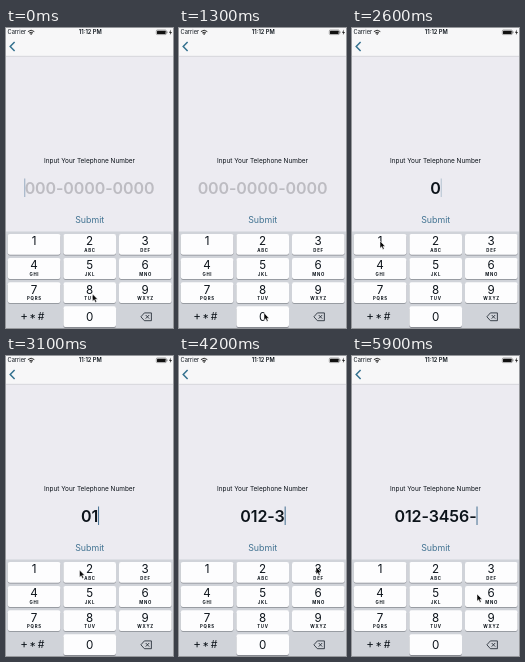
Animation, 167 px wide and 300 px high, one loop 6000 ms. Source, as an HTML page:

```html
<!DOCTYPE html>
<html lang="en">
<head>
<meta charset="utf-8">
<title>Telephone number input</title>
<style>
  html, body { margin: 0; width: 100%; height: 100%; overflow: hidden; background: #ecebf1; }
  svg { display: block; width: 167px; height: 300px; }
  text { font-family: Inter, "Liberation Sans", sans-serif; fill: #0c131a; text-anchor: middle; }
  .status { font-size: 5.7px; }
  .digit { font-size: 11.6px; }
  .letters { font-size: 4.3px; font-weight: 700; letter-spacing: .75px; }
  #number { font-size: 16px; font-weight: 600; letter-spacing: -.1px; }
  #number.hint { fill: #bdbcc2; }
</style>
</head>
<body>
<svg viewBox="0 0 167 300">
  <rect width="167" height="300" fill="#ecebf1"/>
  <rect width="167" height="28" fill="#f7f7f8"/>
  <path d="M0 28.3H167" stroke="#c6c6ca" stroke-width=".6"/>

  <text class="status" x="1.5" y="6.4" style="text-anchor:start">Carrier</text>
  <g fill="none" stroke="#111" stroke-width=".9">
    <path d="M21.9 3.6Q25.1 .8 28.3 3.6M23.2 5Q25.1 3.4 27 5"/>
    <path d="M24 5.7Q25.1 5 26.2 5.7L25.1 7z" fill="#111" stroke="none"/>
  </g>
  <text class="status" x="84.3" y="6.4" font-weight="600">11:12 PM</text>
  <rect x="150.3" y="2" width="10" height="4.6" rx="1" fill="none" stroke="#555" stroke-width=".5"/>
  <rect x="151" y="2.7" width="8.6" height="3.2" rx=".5" fill="#111"/>
  <path d="M161 3.4v1.8" stroke="#555" stroke-width=".7"/>
  <path d="M165 1.6L163 4.7h1.4L163.8 7.1L166 3.9h-1.5z" fill="#111"/>
  <path d="M8.6 14L4.2 18.5L8.6 23" fill="none" stroke="#34718f" stroke-width="1.5"/>

  <text x="83.5" y="135.3" font-size="6.45">Input Your Telephone Number</text>
  <text id="number" x="83.5" y="165.8"></text>
  <rect id="caret" y="150.5" width="1" height="18.5" fill="#446f91"/>
  <text x="83.7" y="194.9" font-size="8.8" style="fill:#427392">Submit</text>

  <rect y="203.5" width="167" height="96.5" fill="#d0d3d9"/>
  <g id="keys"></g>
  <g>
    <text class="digit" x="18" y="292.4">+</text>
    <text class="digit" x="26.6" y="294.6" font-size="13">*</text>
    <text class="digit" x="35" y="292.4" style="font-size:10.5px">#</text>
  </g>
  <g fill="none" stroke="#17202a" stroke-width=".8" stroke-linejoin="round">
    <path d="M138.4 284.9H145.4V292.7H138.4L134.9 288.8z"/>
    <path d="M139.7 287L143.2 290.6M143.2 287L139.7 290.6"/>
  </g>
  <path id="pointer" d="M0 0V7.2L1.7 5.7L2.9 8.4L4.2 7.8L3 5.2H5.2z" fill="#080808" stroke="#fff" stroke-width=".5"/>
</svg>
<script>
  const $ = id => document.getElementById(id);
  const LOOP = 6000, STEP = 100, HINT = '000-0000-0000';

  const letters = ['', 'ABC', 'DEF', 'GHI', 'JKL', 'MNO', 'PQRS', 'TUV', 'WXYZ'];

  function keyMarkup(digit, col, row, label) {
    const x = 1.8 + col * 55.6, y = 206 + row * 24.1, mid = x + 26.2;
    const base = y + (digit ? 11.3 : 14.8);
    return `<rect x="${x}" y="${y + .8}" width="52.6" height="20.8" rx="2" fill="#878a91"/>
      <rect x="${x}" y="${y}" width="52.6" height="20.8" rx="2" fill="#fdfdfe"/>
      <text class="digit" x="${mid}" y="${base}">${digit}</text>
      <text class="letters" x="${mid + .4}" y="${y + 17.8}">${label}</text>`;
  }

  $('keys').innerHTML = letters
    .map((label, i) => keyMarkup(i + 1, i % 3, Math.floor(i / 3), label))
    .join('') + keyMarkup(0, 1, 3, '');

  // [time, value]
  const typed = [
    [0, ''], [1600, '0'], [2700, '01'], [3300, '012-'], [4000, '012-3'],
    [4700, '012-34'], [5200, '012-345'], [5600, '012-3456-']
  ];

  // [time, x, y] of the pointer tip
  const path = [
    [0, 86.5, 266], [600, 86, 270], [1000, 85, 284], [1300, 85, 285],
    [1900, 83.5, 282], [2200, 83.5, 282], [2600, 28, 213], [2800, 28, 213],
    [3100, 73.5, 214], [3300, 82, 213], [3500, 83, 213], [3900, 137, 211],
    [4200, 137, 211], [4600, 28, 237], [4800, 28, 237], [5100, 84.5, 238],
    [5250, 85, 238], [5500, 136, 238], [5700, 136, 238], [5900, 125, 238],
    [6000, 86.5, 266]
  ];

  const ease = p => p * p * (3 - 2 * p);

  function pointerAt(t) {
    const i = path.findIndex(p => p[0] > t);
    const [t0, x0, y0] = path[i - 1], [t1, x1, y1] = path[i];
    const k = ease((t - t0) / (t1 - t0));
    return [x0 + (x1 - x0) * k, y0 + (y1 - y0) * k];
  }

  // Solid after each key press, then fading off and on.
  function caretAlpha(t, pressed) {
    const phase = (t - pressed + (pressed ? 0 : 700)) % 1100;
    if (phase < 600) return 1;
    if (phase < 800) return 1 - (phase - 600) / 200;
    return phase < 950 ? 0 : (phase - 950) / 150;
  }

  function draw(t) {
    const [pressed, value] = typed.filter(k => k[0] <= t).pop();
    const number = $('number'), caret = $('caret');
    number.textContent = value || HINT;
    number.classList.toggle('hint', !value);
    const half = number.getComputedTextLength() / 2;
    caret.setAttribute('x', 83.5 + (value ? half : -half - .4));
    caret.setAttribute('opacity', caretAlpha(t, pressed));
    $('pointer').setAttribute('transform', `translate(${pointerAt(t)})`);
  }

  const start = performance.now();
  function tick() {
    const t = (performance.now() - start) % LOOP;
    draw(Math.floor(t / STEP) * STEP);
    requestAnimationFrame(tick);
  }
  tick();
</script>
</body>
</html>
```
